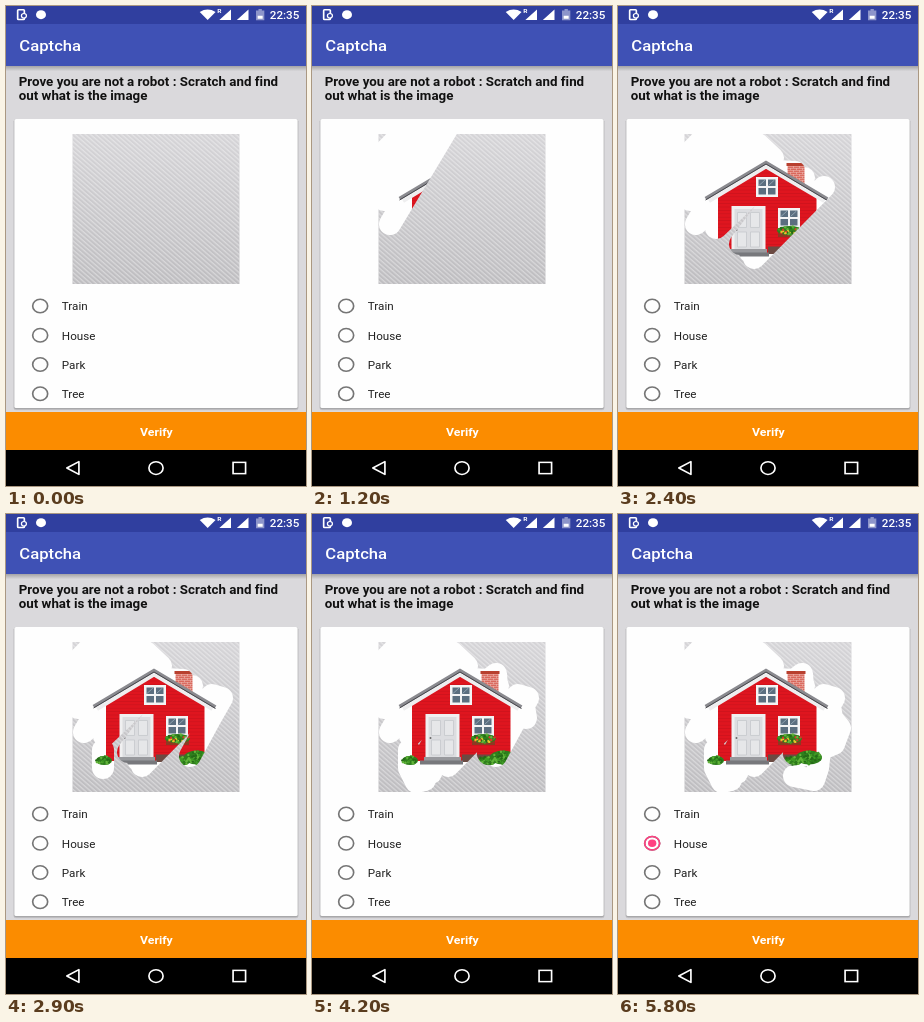
These frames come from a looping animation (300 by 480 pixels, 7300 ms). An HTML page:

```html
<!DOCTYPE html>
<html lang="en">
<head>
<meta charset="utf-8">
<title>Scratch captcha</title>
<style>
  html, body { margin: 0; width: 100%; height: 100%; overflow: hidden; }
  svg { display: block; width: 100%; height: 100%; font-family: Roboto, sans-serif; }
</style>
</head>
<body>
<!-- A 360 x 640 phone screen, squeezed onto the stage -->
<svg viewBox="0 0 360 640" preserveAspectRatio="none">
  <defs>
    <linearGradient id="foil" x2="0" y2="1">
      <stop stop-color="#d5d4d7"/><stop offset="1" stop-color="#bebdc0"/>
    </linearGradient>
    <linearGradient id="shade" x2="0" y2="1">
      <stop stop-opacity=".25"/><stop offset="1" stop-opacity="0"/>
    </linearGradient>
    <pattern id="hatch" width="4" height="3.4" patternUnits="userSpaceOnUse" patternTransform="rotate(41)">
      <rect width="4" height="1.3" fill="#fff" opacity=".38"/>
    </pattern>
    <pattern id="siding" width="8" height="3.4" patternUnits="userSpaceOnUse">
      <rect width="8" height="3.4" fill="#df151f"/><rect width="8" height=".6" fill="#c8121b"/>
    </pattern>
    <pattern id="brick" width="6" height="4" patternUnits="userSpaceOnUse">
      <rect width="6" height="4" fill="#d9675b"/>
      <path d="M0 .4H6M0 2.4H6M1.5 0V2M4.5 2V4" stroke="#efb9b1" stroke-width=".6"/>
    </pattern>
    <mask id="unscratched" maskUnits="userSpaceOnUse" x="60" y="120" width="180" height="165">
      <rect x="60" y="120" width="180" height="165" fill="#fff"/>
      <path id="scratch" fill="none" stroke="#000" stroke-width="22" stroke-linecap="round" stroke-linejoin="round"/>
    </mask>
    <g id="window">
      <rect width="22" height="20" fill="#f4f4f5"/>
      <path d="M2.5 2.5h7.5v6.5h-7.5zM12 2.5h7.5v6.5H12zM2.5 11h7.5v6.5h-7.5zM12 11h7.5v6.5H12z" fill="#5b6e7f"/>
      <path d="M3 8.500l6-5.500M12.500 8.500l6-5.500" stroke="#8fa2b0"/>
    </g>
  </defs>

  <rect width="360" height="640" fill="#dad9dc"/>
  <rect y="80" width="360" height="7" fill="url(#shade)"/>
  <rect width="360" height="80" fill="#3f51b5"/>
  <rect width="360" height="24" fill="#303f9f"/>

  <g fill="#fff">
    <rect x="14" y="5" width="8" height="13" rx="1" fill="none" stroke="#fff" stroke-width="2"/>
    <circle cx="21.500" cy="13" r="3" fill="#303f9f" stroke="#fff" stroke-width="1.500"/>
    <circle cx="42" cy="11.500" r="6"/>
    <path d="M242 18.500L232.500 8Q242 1.500 251.500 8zM256 18.500H270V4.500zM277 18.500H291V4.500z"/>
    <text x="253.500" y="10" font-size="8" font-weight="700">R</text>
    <path d="M300 6h3V4h4v2h3v13h-10z" opacity=".45"/>
    <path d="M302 13h6v4h-6z"/>
    <text x="352" y="17" font-size="14" font-weight="500" text-anchor="end">22:35</text>
    <text x="16" y="59.500" font-size="20" font-weight="500">Captcha</text>
  </g>

  <g font-size="16" font-weight="700" fill="#111" letter-spacing=".03">
    <text x="15.200" y="107.200">Prove you are not a robot : Scratch and find</text>
    <text x="15.200" y="126">out what is the image</text>
  </g>

  <rect x="9" y="151" width="342" height="388" rx="3" opacity=".1"/>
  <rect x="9.500" y="151" width="341" height="386.500" rx="2.500" opacity=".14"/>
  <rect x="10" y="150.500" width="340" height="385.500" rx="2" fill="#fefefe"/>

  <!-- Scratch picture, in stage pixels -->
  <g transform="scale(1.2 1.33333)">
    <path d="M169.500 159h17v28l-17-11z" fill="url(#brick)"/>
    <path d="M168.500 157h19v3h-19z" fill="#b8402f"/>
    <path d="M100 247V189L148 160L198.500 189V247z" fill="url(#siding)"/>
    <path d="M150 240.500H198.500V248H150z" fill="#6b4a42"/>
    <path d="M91 195L148 160.500L206.500 195" fill="none" stroke="#eeeeef" stroke-width="4"/>
    <path d="M87.500 192.500L148 156.500L209.500 193" fill="none" stroke="#8a8a8f" stroke-width="3.400"/>
    <path d="M87.500 194L148 158L209.500 194.500" fill="none" stroke="#47474c"/>
    <use href="#window" x="138" y="171"/>
    <use href="#window" x="160" y="202"/>
    <path d="M113.500 200h34v46h-34z" fill="#f0f0f1"/>
    <path d="M116.500 203h28v42h-28z" fill="#dcdde0"/>
    <path d="M119.500 206.500h9v15h-9zM132.500 206.500h9v15h-9zM119.500 226h9v15h-9zM132.500 226h9v15h-9z" fill="#e6e7e9" stroke="#c6c8cc" stroke-width=".8"/>
    <circle cx="118.500" cy="224" r="1" fill="#666"/>
    <path d="M112 243h37v4h-37z" fill="#98999d"/>
    <path d="M108 246.500h43v4h-43z" fill="#77787c"/>
    <path d="M160 225h23v6h-23z" fill="#8d3a22"/>
    <g id="plants"></g>

    <g mask="url(#unscratched)">
      <rect x="66.500" y="128" width="167" height="150" fill="url(#foil)"/>
      <rect x="66.500" y="128" width="167" height="150" fill="url(#hatch)"/>
    </g>
  </g>

  <g id="options" font-size="14" fill="#222"></g>

  <rect y="541.333" width="360" height="51" fill="#fb8c00"/>
  <text x="180.500" y="573" font-size="14.700" font-weight="700" fill="#fff" text-anchor="middle">Verify</text>
  <rect y="592" width="360" height="48"/>
  <g fill="none" stroke="#fff" stroke-width="2">
    <path d="M73 616L87.500 607.500V624.500z" stroke-linejoin="round"/>
    <circle cx="180" cy="616" r="8.500"/>
    <rect x="272.500" y="608.500" width="15" height="15"/>
  </g>
</svg>

<script>
const LOOP = 7300, STEP = 100, TAP = 5400;
const $ = id => document.getElementById(id);

// Finger strokes: one x, y pair per step from the start time on
const strokes = [
  { start: 100, points: [
    60,158, 80,138, 98,118, 114,120, 88,146, 60,174, 92,146, 124,116,
    98,154, 72,194, 138,118, 78,218, 118,165, 140,138, 155,152, 98,222,
    158,165, 177,166, 122,238, 186,172, 132,246, 186,190, 136,252, 206,181,
    216,184, 204,205, 184,242] },
  { start: 2800, points: [97,236, 97,254, 104,268, 113,266, 111,246, 134,206] },
  { start: 3500, points: [119,259, 145,190, 184,160, 188,214, 176,240] },
  { start: 4100, points: [212,192, 214,204, 222,214, 216,230, 202,236, 200,254, 196,266, 176,262] }
];

function strokePath({ start, points }, time) {
  const steps = (time - start) / STEP + 1;
  return steps > 0 ? `M${points.slice(0, 2)} L${points.slice(0, 2 * steps)}` : '';
}

let seed = 5;
const random = () => (seed = seed * 16807 % 2147483647) / 2147483647;

function plant(cx, cy, rx, ry, leaves, colors) {
  let dots = `<ellipse cx="${cx}" cy="${cy}" rx="${rx}" ry="${ry}" fill="#2f7f1d"/>`;
  for (let i = 0; i < leaves; i++) {
    const angle = random() * 2 * Math.PI, reach = Math.sqrt(random());
    dots += `<circle cx="${cx + rx * reach * Math.cos(angle)}" cy="${cy + ry * reach * Math.sin(angle)}"
      r="1.2" fill="${colors[i % colors.length]}"/>`;
  }
  return dots;
}

const greens = ['#3f9a25', '#256b17', '#62b53a'];
$('plants').innerHTML =
  plant(171.5, 224.5, 12.5, 4.5, 34, [...greens, '#e8c52c', '#d63a2a']) +
  plant(98, 246.5, 8, 4.5, 26, greens) +
  plant(175, 247, 9.5, 4.5, 30, greens) +
  plant(191, 243.5, 13, 7, 50, greens);

$('options').innerHTML = ['Train', 'House', 'Park', 'Tree'].map((label, i) => {
  const y = 400 + 39 * i;
  return `<circle cx="41" cy="${y}" r="9" fill="none" stroke="#757575" stroke-width="2"/>
    <text x="67" y="${y + 5.8}">${label}</text>`;
}).join('') + `<circle id="ripple" cx="41" cy="439" r="14"/>
  <circle id="ring" cx="41" cy="439" r="9" fill="none" stroke="#ff4081" stroke-width="2"/>
  <circle id="dot" cx="41" cy="439" fill="#ff4081"/>`;

function draw(now) {
  const time = Math.floor(now % LOOP / STEP) * STEP;
  $('scratch').setAttribute('d', strokes.map(stroke => strokePath(stroke, time)).join(' '));

  const tap = time - TAP;
  $('ring').setAttribute('opacity', tap >= 100 ? 1 : 0);
  $('dot').setAttribute('r', Math.max(0, Math.min(5, tap / 50)));
  $('ripple').setAttribute('opacity', tap >= 0 ? Math.max(0, 0.12 * (1 - tap / 400)) : 0);
}

const start = performance.now();
function tick() {
  draw(performance.now() - start);
  requestAnimationFrame(tick);
}
tick();
</script>
</body>
</html>
```
